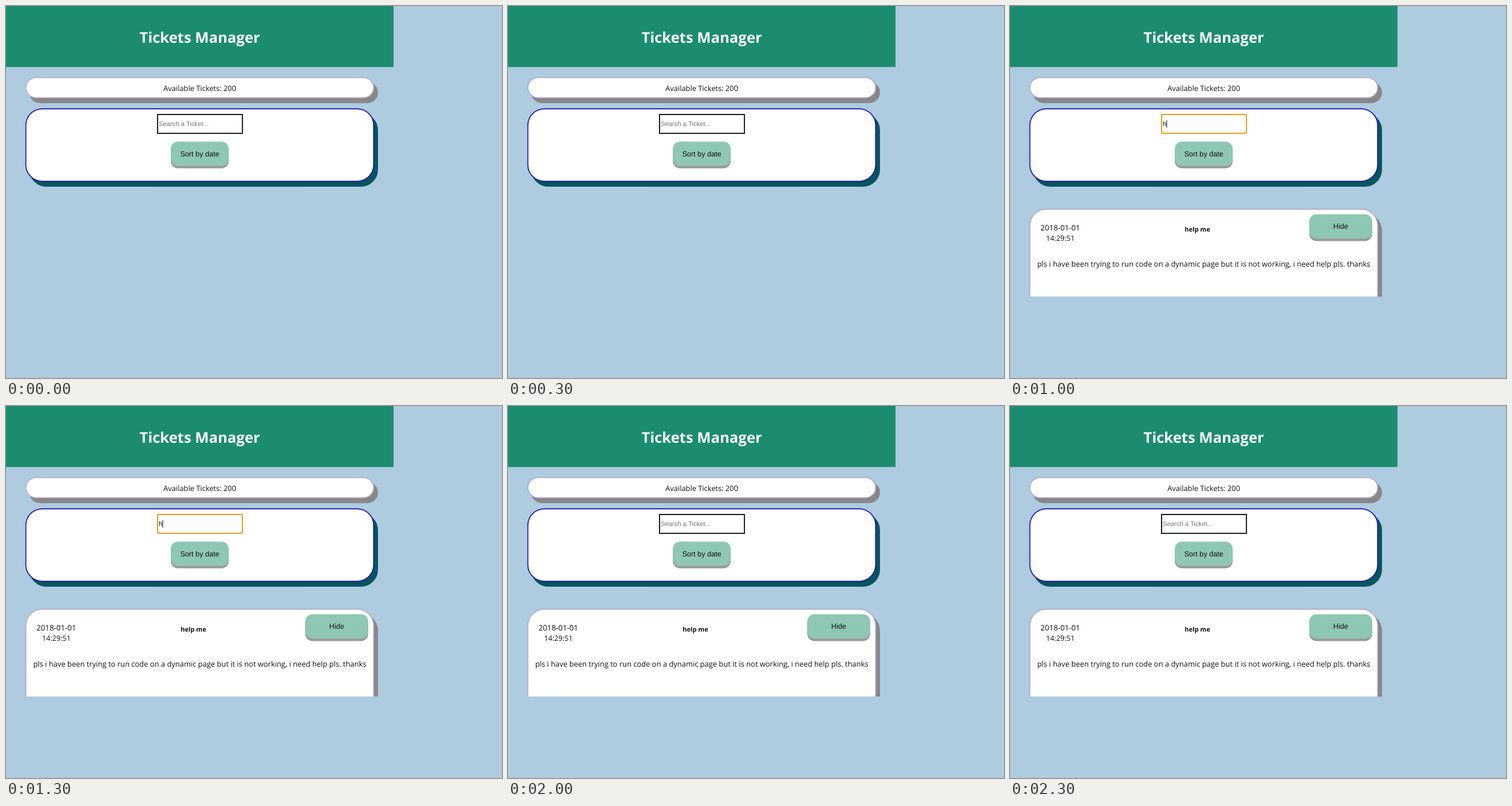
An HTML page that plays this animation: 864x648 px, repeating every 2500 ms.

```html
<!DOCTYPE html>
<html lang="en">
<head>
<meta charset="utf-8">
<title>Tickets Manager</title>
<style>
  html, body { margin: 0; width: 100%; height: 100%; overflow: hidden; background: #aecbe0; }
  svg { display: block; width: 864px; height: 648px; }
  text { font: 12.9px "Open Sans", "Noto Sans", sans-serif; fill: #111; text-anchor: middle;
         text-rendering: geometricPrecision; white-space: pre; }
  .ui { font-family: "Liberation Sans", Arial, sans-serif; }
  .start { text-anchor: start; }
  .bold { font-weight: 700; }
</style>
</head>
<body>
<svg id="stage" viewBox="0 0 864 648"></svg>
<script>
const SHADOW = { x: 6.75, y: 8.44 };
const LINE = 17.72;
const LAVENDER = "#aeaad2", GREY = "#888";

const text = (x, y, str, size = 12.9, cls = "", fill = "#111") =>
  `<text x="${x}" y="${y}" class="${cls}" style="font-size:${size}px;fill:${fill}">${str}</text>`;

const rect = (x, y, w, h, r, fill, extra = "") =>
  `<rect x="${x}" y="${y}" width="${w}" height="${h}" rx="${r}" fill="${fill}" ${extra}/>`;

// White rounded box with an inner border and a hard drop shadow
const panel = (y, h, r, border, shadow) =>
  rect(33.75 + SHADOW.x, y + SHADOW.y, 607.5, h, r, shadow) +
  rect(34.6, y + .85, 605.8, h - 1.7, r - .85, "#fff", `stroke="${border}" stroke-width="1.7"`);

const button = (x, y, w, label) =>
  rect(x, y + 4.2, w, 42.4, 12.7, "#999") +
  rect(x, y, w, 42.4, 12.7, "#8ec7b4") +
  text(x + w / 2, y + 25.6, label, 12.66, "ui");

const searchBox = focused => focused
  ? rect(264, 189, 147.8, 32.8, 2.5, "#fff", 'stroke="#e09a10" stroke-width="2"') +
    text(266, 209.4, "h", 11.25, "ui start") +
    rect(272.5, 199, 1, 13, 0, "#000")
  : rect(264, 189, 147.8, 32.8, 0, "#fff", 'stroke="#000" stroke-width="1.8"') +
    text(266, 209.4, "Search a Ticket...", 11.25, "ui start", "#757575");

const card = ({ date, time, title, titleSize, body, bodyY }) =>
  panel(353, 400, 29.5, LAVENDER, GREY) +
  button(521.3, 362.8, 109.6, "Hide") +
  text(87.7, 390.8, date, 13.2) +
  text(87.7, 408.6, time, 12.6) +
  text(326.5, 393.4, title, titleSize, "bold") +
  body.map((line, i) => text(337.5, bodyY + i * LINE, line)).join("");

const helpTicket = {
  date: "2018-01-01", time: "14:29:51", title: "help me", titleSize: 11.05, bodyY: 454,
  body: ["pls i have been trying to run code on a dynamic page but it is not working, i need help pls. thanks"],
};
const notifyTicket = {
  date: "2018-07-12", time: "22:34:00", title: "Notifications not working", titleSize: 10.65, bodyY: 513.4,
  body: [
    "Hi I was working with kez crm backend notificatication and just stoped working. See the code",
    "bellow CRM Backend code import wixCrm from 'wix-crm-backend'; export function",
    "notifySiteContributors(body, titulo, acao, url) { wixCrm.notifications.notify( body, [\"Mobile\",",
    "\"Dashboard\"], { title: titulo, actionTitle: acao, targetUrl: url }); } thanks",
  ],
};

const header =
  rect(0, 0, 675, 106.3, 0, "#1b8c6f") +
  text(337.5, 64, "Tickets Manager", 25.6, "bold", "#fff");

const page = ({ ticket, focused, top = 0, bottom = 506, shift = 0 }) => `
  <clipPath id="view"><rect y="${top}" width="864" height="${bottom - top}"/></clipPath>
  <g clip-path="url(#view)"><g transform="translate(0 ${shift})">
    ${header}
    ${panel(123.7, 37, 18.5, LAVENDER, GREY)}
    ${text(337.5, 147.6, "Available Tickets: 200", 12.85)}
    ${panel(178.2, 128, 29.5, "#1c10b0", "#07545f")}
    ${searchBox(focused)}
    ${button(287, 236.2, 101, "Sort by date")}
    ${ticket ? card(ticket) : ""}
  </g></g>`;

const STEP = 500;
const scenes = [
  {},
  { ticket: helpTicket },
  { ticket: helpTicket, focused: true },
  { ticket: notifyTicket, top: 330, bottom: 648, shift: 91.2 },
  { ticket: helpTicket },
].map(page);

const stage = document.getElementById("stage");
let shown = -1;
function draw() {
  const current = Math.floor(performance.now() / STEP) % scenes.length;
  if (current !== shown) stage.innerHTML = scenes[shown = current];
  requestAnimationFrame(draw);
}
draw();
</script>
</body>
</html>
```
